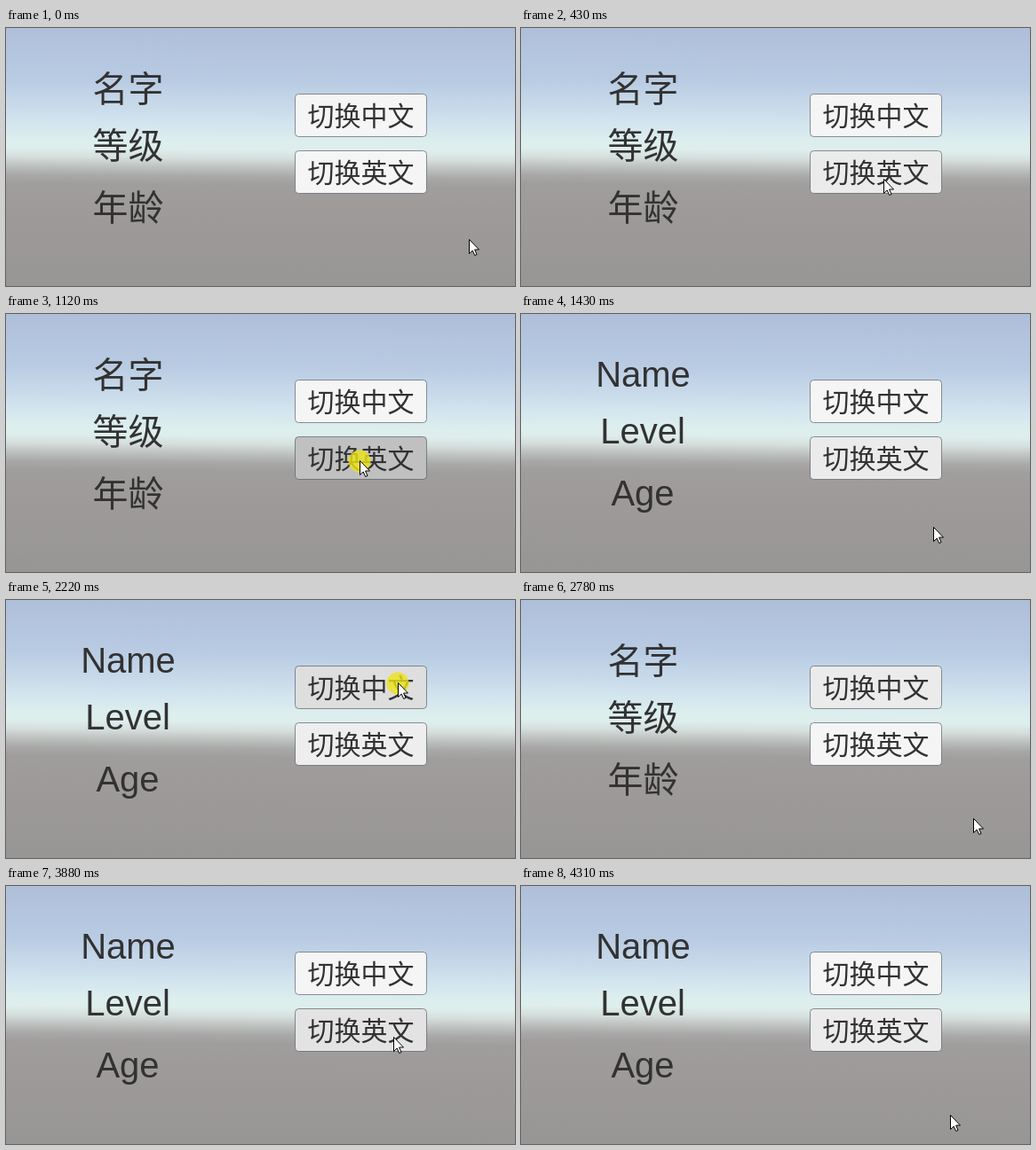
Recreate the animation shown at these times as an HTML page. Size 573 px wide and 291 px high, loop 4340 ms.

```html
<!DOCTYPE html>
<html lang="zh-CN">
<head>
<meta charset="utf-8">
<title>Language switch</title>
<style>
  html, body { margin: 0; width: 100%; height: 100%; overflow: hidden; }
  svg {
    display: block; width: 573px; height: 291px;
    background: linear-gradient(180.5deg,
      #afbed8 0, #b4c5df 35px, #b9cbe3 62px, #c7d9e9 90px, #d2e4ee 110px,
      #ddeeee 130px, #deeeec 140px, #d5dedc 150px, #bec2c0 160px,
      #a9a9a8 170px, #a09d9d 180px, #9e9b9a 200px, #989694 291px);
  }
  text { fill: #323232; text-anchor: middle; }
  .zh { font: 300 40px "Noto Sans CJK SC", "Noto Sans CJK", sans-serif; }
  .en { font: 40px "Liberation Sans", Arial, sans-serif; }
  .btn text { font-size: 30px; }
  .btn rect { stroke: rgba(70, 78, 88, .6); stroke-width: 1; }
</style>
</head>
<body>
<svg viewBox="0 0 573 291">
  <g id="zh" class="zh">
    <text x="137.5" y="83">名字</text>
    <text x="137.5" y="146.5">等级</text>
    <text x="137.5" y="217">年龄</text>
  </g>
  <g id="en" class="en">
    <text x="137.5" y="82">Name</text>
    <text x="137" y="146">Level</text>
    <text x="137" y="216">Age</text>
  </g>
  <g class="btn zh">
    <rect id="top" x="325.5" y="74.5" width="148" height="48" rx="4"/>
    <text x="399.5" y="110">切换中文</text>
    <rect id="bottom" x="325.5" y="138.5" width="148" height="48" rx="4"/>
    <text x="399.5" y="174">切换英文</text>
  </g>
  <g id="cursor">
    <circle id="press" cy="1" r="12.5" fill="#ece214" fill-opacity=".8"/>
    <path d="M.5.5V16.5L4.2 13L6.7 18.5L9 17.5L6.6 12H11.5Z" fill="#fff" stroke="#000" stroke-linejoin="round"/>
  </g>
</svg>
<script>
  const LOOP = 4340, FADE = 100;
  const NORMAL = 245, HOVER = 235, DOWN = 192;
  const START = [521, 238];

  // Pointer moves: start, end, control point, target
  const moves = [
    [50, 520, 450, 190, 398, 165],
    [1160, 1430, 425, 205, 464, 240],
    [1870, 2170, 495, 140, 441, 93],
    [2420, 2780, 470, 180, 509, 246],
    [3240, 3540, 465, 195, 434, 165],
    [3820, 4290, 460, 220, 483, 258]
  ];
  const clicks = [[1010, 1150], [2190, 2400], [3660, 3800]];

  // Button shades: time the fade begins, shade it fades to
  const shades = {
    top: [[2090, HOVER], [2190, DOWN], [2400, HOVER], [3660, NORMAL]],
    bottom: [[300, HOVER], [1010, DOWN], [1150, HOVER], [2190, NORMAL],
             [3420, HOVER], [3660, DOWN], [3800, HOVER]]
  };

  const $ = id => document.getElementById(id);
  const clamp = v => Math.min(1, Math.max(0, v));
  const show = (id, on) => $(id).setAttribute('visibility', on ? 'visible' : 'hidden');

  function pointer(t) {
    let [x, y] = START;
    for (const [from, to, cx, cy, ex, ey] of moves) {
      if (t < from) break;
      const p = clamp((t - from) / (to - from));
      const u = p * p * (3 - 2 * p);
      const mix = (a, b, c) => (1 - u) * (1 - u) * a + 2 * u * (1 - u) * b + u * u * c;
      x = mix(x, cx, ex);
      y = mix(y, cy, ey);
    }
    return [Math.round(x), Math.round(y)];
  }

  function shade(steps, t) {
    let v = NORMAL;
    for (const [at, to] of steps) v += (to - v) * clamp((t - at) / FADE);
    return Math.round(v);
  }

  function draw(t) {
    const english = (t >= clicks[0][1] && t < clicks[1][1]) || t >= clicks[2][1];
    show('en', english);
    show('zh', !english);
    for (const id in shades) {
      const v = shade(shades[id], t);
      $(id).setAttribute('fill', `rgb(${v},${v},${v})`);
    }
    show('press', clicks.some(([down, up]) => t >= down && t < up));
    $('cursor').setAttribute('transform', `translate(${pointer(t)})`);
  }

  const t0 = performance.now();
  function tick() {
    draw((performance.now() - t0) % LOOP);
    requestAnimationFrame(tick);
  }
  tick();
</script>
</body>
</html>
```
